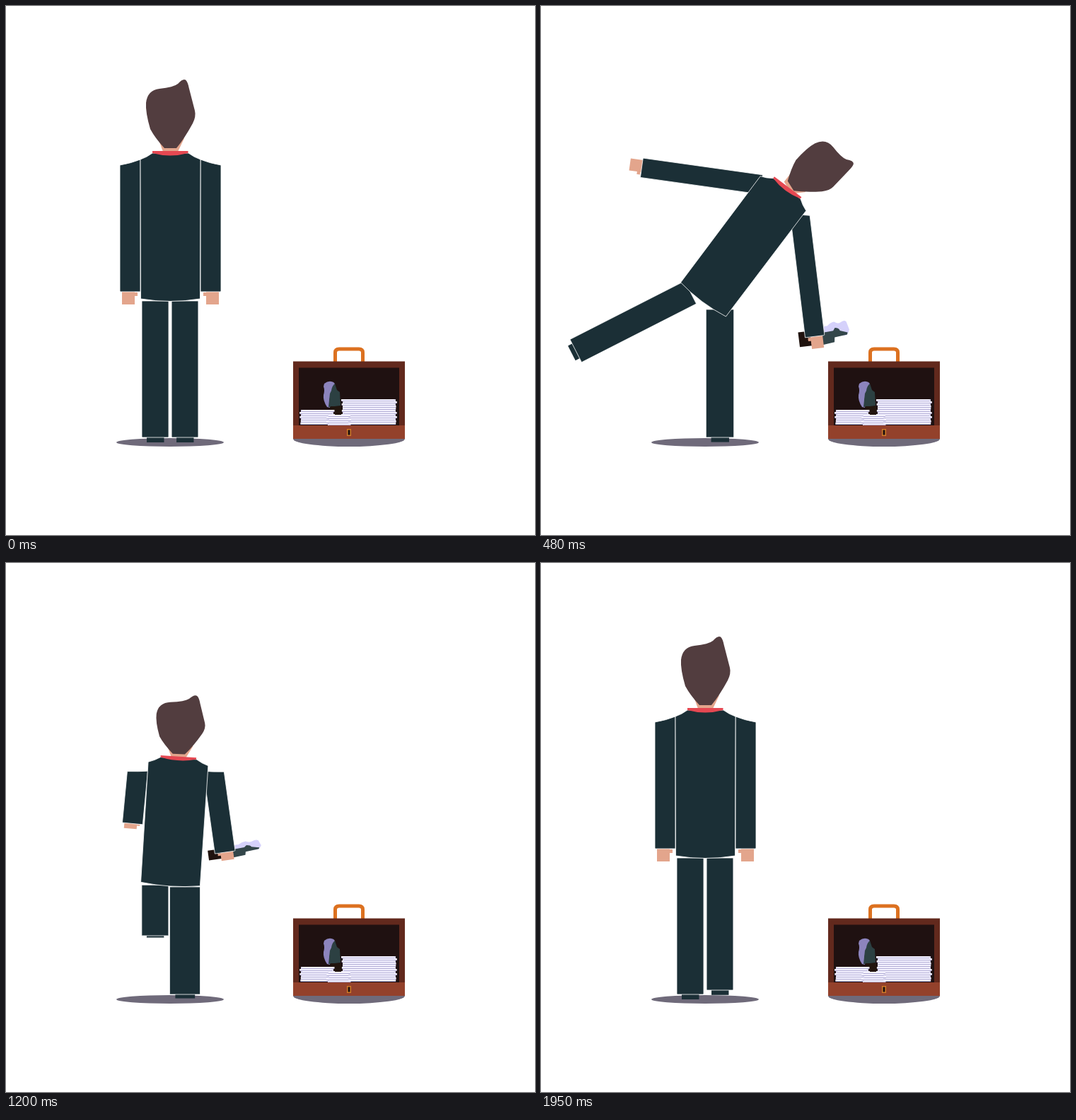
An HTML page with a canvas that plays this animation: 748x748 px, repeating every 2100 ms.

```html
<!DOCTYPE html>
<html lang="en">
<head>
<meta charset="utf-8">
<title>Throw from the briefcase</title>
<style>
html, body { margin: 0; width: 100%; height: 100%; overflow: hidden; background: #fff; }
canvas { display: block; }
</style>
</head>
<body>
<canvas id="stage" width="748" height="748"></canvas>
<script>
const ctx = document.getElementById('stage').getContext('2d');
const SUIT = '#1b2f36', SKIN = '#e3a58c', HAIR = '#523d3f', RED = '#e54852', SHADOW = '#6f6a7a';
const LOOP = 2100, STEP = 30, LAST = 1950, GRAB = 330, RELEASE = 1410;
const GROUND = 610, LEG = 192, BASE = { x: 232.5, y: 414 };

// Angles in degrees; wide and tall foreshorten the body, reach an arm; lift raises a foot.
const stand = {
  lean: 0, wide: 1, tall: 1, shift: 0, drop: 0, head: 0,
  armL: 0, armR: 0, reachL: 1, reachR: 1, shrugX: 0, shrugY: 0,
  legL: 0, legR: 0, liftL: 0, liftR: 0
};
const reach = {
  lean: 60, wide: .9, tall: .9, drop: 23, head: 65,
  armL: 128, armR: 3, shrugX: 5, shrugY: -7, legL: 75, liftL: 16
};
const grab = { ...reach, lean: 66, head: 72, armR: -20 };
const carry = {
  lean: 37, wide: .953, tall: .953, shift: -3, drop: 1, head: 58,
  armL: 98, armR: -7, shrugX: -3, shrugY: 5, legL: 63, liftL: 23
};
const rise = { lean: -1.5, head: 5, armL: -5, armR: -13.6, shrugX: -9, shrugY: -4, legL: -1.3 };
const windup = {
  lean: 3.7, tall: .865, drop: 40, head: 3,
  armL: 5.5, armR: -8, reachL: .47, reachR: .73, shrugX: -3, liftL: 83
};
const swing = { tall: .97, drop: 6, armR: 4, reachL: .75, reachR: -.95, liftL: 30 };
const land = {
  lean: 1, tall: .865, drop: 9.5, armL: 2.8, reachL: 1.04, reachR: -.12,
  shrugX: -2, shrugY: -10, legR: 1.3, liftR: 25
};

const linear = k => k;
const easeOut = k => 1 - (1 - k) ** 3;
const keys = [
  [0, {}, linear], [240, reach, linear], [GRAB, grab, linear], [480, carry, linear],
  [690, rise, easeOut], [1200, windup, linear], [1350, swing, linear],
  [1500, land, linear], [LAST, { liftR: 6 }, easeOut]
].map(([time, pose, ease]) => ({ time, ease, pose: { ...stand, ...pose } }));

function poseAt(t) {
  const i = Math.max(1, keys.findIndex(key => t <= key.time));
  const a = keys[i - 1], b = keys[i];
  const k = b.ease((t - a.time) / (b.time - a.time)), pose = {};
  for (const name in stand) pose[name] = a.pose[name] + (b.pose[name] - a.pose[name]) * k;
  return pose;
}

function fill(color, d) {
  ctx.fillStyle = color;
  ctx.fill(new Path2D(d));
}
// Suit cloth with a white seam of constant width under any scaling.
function cloth(d) {
  fill(SUIT, d);
  const seam = new Path2D();
  seam.addPath(new Path2D(d), ctx.getTransform());
  ctx.save();
  ctx.resetTransform();
  ctx.strokeStyle = '#fff';
  ctx.lineWidth = .8;
  ctx.stroke(seam);
  ctx.restore();
}
function box(color, x, y, w, h) {
  ctx.fillStyle = color;
  ctx.fillRect(x, y, w, h);
}
function ellipse(x, y, rx, ry) {
  ctx.fillStyle = SHADOW;
  ctx.beginPath();
  ctx.ellipse(x, y, rx, ry, 0, 0, 7);
  ctx.fill();
}

// Shapes are drawn in standing coordinates around a pivot (px, py) that lands on (x, y).
function place(px, py, x, y, angle, sx, sy, draw) {
  ctx.save();
  ctx.translate(x, y);
  ctx.rotate(angle * Math.PI / 180);
  ctx.scale(sx, sy);
  ctx.translate(-px, -py);
  draw();
  ctx.restore();
}

function leg(x) {
  box(SUIT, x + 7, 607, 24.5, 9);
  cloth(`M${x} 417h38v191q0 1-1 1h-36q-1 0-1-1z`);
}
function arm() {
  fill(SKIN, 'M164 403H182V405H186V410H182V422H164z');
  cloth('M161 225Q178 222 190 217V404H162.5Q161 404 161 402.5z');
}
function mirrorArm() {
  ctx.translate(2 * BASE.x, 0);
  ctx.scale(-1, 1);
  arm();
}
function bottle() {
  ctx.save();
  ctx.translate(289.5, 404);
  fill('#d5d1fb', 'M10-8Q14-15 20-13Q26-18 31-18Q36-14 40-16Q46-20 49-16L52-4Q49 4 44 4L29-2L12-4z');
  fill('#33464a', 'M10-4L28-5L31-9Q37-8 38-4L49 0L48 3L29 5L28 12L10 14z');
  box('#20130f', -24, -9, 18, 22);
  ctx.restore();
}

function stack(x, y, w, rows) {
  box('#d9d6f0', x, y, w, rows * 3);
  for (let i = 0; i < rows; i++) {
    const jog = 2 * Math.sin(i * 2.7 + x);
    box('#f3f1ff', x + jog, y + i * 3, w, 2);
    box('#b4afd6', x + jog, y + i * 3 + 2, w, 1);
  }
}
function briefcase() {
  ellipse(485, 612, 79, 11);
  ctx.strokeStyle = '#dc7120';
  ctx.lineWidth = 5;
  ctx.stroke(new Path2D('M465.5 503V490Q465.5 485 471 485H499Q504.5 485 504.5 490V503'));
  box('#62291d', 406, 502.5, 158, 109.5);
  box('#1f1111', 414, 511.5, 142, 82);
  fill('#8c84bd', 'M450 534Q455 530 460 531Q466 532 465 537L460 546Q456 556 458 568L454 567Q448 558 449 550Q451 543 449 538z');
  fill('#2c4042', 'M460 544Q461 537 465 534L468 543L472 546L473 565L456 567L458 548z');
  fill('#22150e', 'M459 566H474L476 578H461z');
  stack(417, 571, 46, 7);
  stack(476, 556, 75, 12);
  stack(455, 578, 31, 5);
  box('#93412b', 406, 593, 158, 19);
  box('#d07a28', 482, 598, 6, 10);
  box('#20110e', 483.5, 599.5, 3, 7);
}

function man(t) {
  const p = poseAt(t), rad = p.lean * Math.PI / 180, c = Math.cos(rad), s = Math.sin(rad);
  const x = BASE.x + p.shift, y = BASE.y + p.drop;

  // Where a point of the standing torso is now.
  const joint = (px, py) => {
    const dx = (px - BASE.x) * p.wide, dy = (py - BASE.y) * p.tall;
    return [x + dx * c - dy * s, y + dx * s + dy * c];
  };
  const torso = draw => place(BASE.x, BASE.y, x, y, p.lean, p.wide, p.tall, draw);
  const head = draw => place(BASE.x, 207, ...joint(BASE.x, 207), p.head, p.wide, p.tall, draw);

  ellipse(232, 617, 76, 6);

  // The left leg kicks from the hip; the right one stays under the body and bends.
  const [lx, ly] = joint(211, 417), ry = joint(253, 417)[1];
  const bend = (GROUND - ry) / LEG;
  place(211, 417, lx, ly, p.legL, p.wide, (GROUND - p.liftL - ly) / LEG, () => leg(192));
  place(253, 417, 253, ry, p.legR, 1 + .65 * (1 - bend), bend - p.liftR / LEG, () => leg(234));

  place(186, 245, ...joint(186, 245), p.armL, p.wide, p.reachL * p.tall, arm);
  const [ax, ay] = joint(279, 245);
  place(279, 245, ax + p.shrugX, ay + p.shrugY, p.armR, p.wide, p.reachR * p.tall, () => {
    if (t >= GRAB && t < RELEASE) bottle();
    mirrorArm();
  });

  torso(() => cloth('M190 217Q199 214 207 208H258Q266 214 275 217L274.5 414Q232 421 190.5 414z'));
  head(() => fill(SKIN, 'M217 192L222 206H243L252 187z'));
  torso(() => fill(RED, 'M207 205H257.5V208Q232 215 207 208z'));
  head(() => fill(HAIR,
    'M224 201Q211 187 204 174Q197 150 198 137Q200 119 217 117Q237 115 243 110Q250 102 254 104.5Q257 107 259 117L267 148Q269 156 264 166Q252 188 241 201z'));
}

function frame() {
  const now = performance.now() - start;
  const t = Math.min(Math.floor(now % LOOP / STEP) * STEP, LAST);
  box('#fff', 0, 0, 748, 748);
  briefcase();
  man(t);
  requestAnimationFrame(frame);
}
ctx.lineJoin = 'round';
const start = performance.now();
frame();
</script>
</body>
</html>
```
